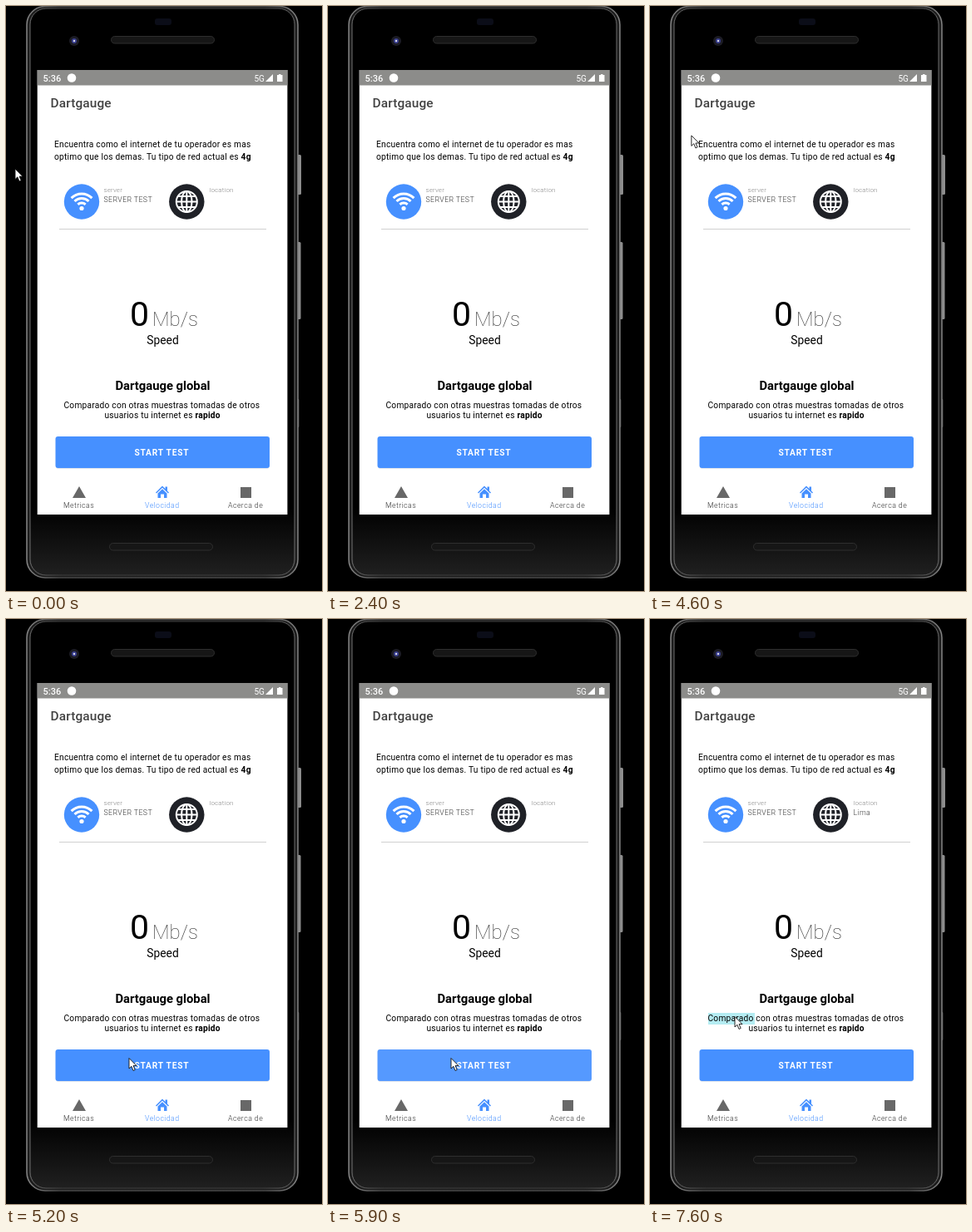
Write an HTML page that moves like this. It is 380x704 px and loops after 8000 ms.

```html
<!DOCTYPE html>
<html lang="es">
<head>
<meta charset="utf-8">
<title>Dartgauge</title>
<style>
  html, body { margin: 0; width: 100%; height: 100%; overflow: hidden; background: #000; }
  svg { display: block; width: 380px; height: 704px; }
  text { font-family: Roboto, "Liberation Sans", sans-serif; white-space: pre; }
  .body { font-size: 10.2px; letter-spacing: .23px; fill: #000; }
  .body tspan { font-weight: 700; }
  .label { font-size: 8px; font-weight: 300; letter-spacing: .15px; fill: #888; }
  .value { font-size: 8.76px; font-weight: 300; letter-spacing: .4px; fill: #333; }
  .tab { font-size: 8.76px; font-weight: 300; letter-spacing: .45px; fill: #333; }
  .mid { text-anchor: middle; }
  .line { fill: none; stroke: #fff; }
</style>
</head>
<body>
<svg viewBox="0 0 380 704">
  <defs>
    <linearGradient id="edge">
      <stop offset="0" stop-color="#858585"/>
      <stop offset=".12" stop-color="#484848"/>
      <stop offset=".88" stop-color="#484848"/>
      <stop offset="1" stop-color="#858585"/>
    </linearGradient>
    <linearGradient id="glass" x2="0" y2="1">
      <stop offset=".88" stop-color="#000"/>
      <stop offset="1" stop-color="#202020"/>
    </linearGradient>
    <clipPath id="button"><rect x="59.5" y="518" width="257.5" height="38" rx="3"/></clipPath>
  </defs>

  <!-- phone -->
  <g fill="#8d8d8d">
    <rect x="350" y="179" width="5" height="48" rx="1.5"/>
    <rect x="350" y="284" width="4.5" height="93" rx="1.5"/>
    <rect x="350" y="473" width="2.5" height="34" rx="1" fill="#444"/>
  </g>
  <rect x="25" y="0.500" width="326" height="687.500" rx="22" fill="#1c1c1c" stroke="url(#edge)" stroke-width="1.500"/>
  <rect x="29" y="3" width="318" height="682" rx="19" fill="url(#glass)" stroke="url(#edge)" stroke-width=".8"/>
  <rect x="179" y="15" width="20" height="8" rx="3" fill="#0b0d18"/>
  <circle cx="82" cy="42" r="6" fill="#1c1c24"/>
  <circle cx="82" cy="42" r="3" fill="#3a3f90"/>
  <circle cx="82" cy="42" r="1.200" fill="#dde"/>
  <g fill="#161616" stroke="#2e2e2e">
    <rect x="126.500" y="36.500" width="124" height="8.500" rx="4.200"/>
    <rect x="124.500" y="646.500" width="124" height="8.500" rx="4.200"/>
  </g>

  <!-- screen and status bar -->
  <rect x="37.700" y="77" width="300.700" height="535" fill="#fff"/>
  <rect x="37.700" y="77" width="300.700" height="18.500" fill="#8c8c8a"/>
  <g fill="#fff">
    <text x="44.500" y="91" font-size="11" font-weight="500">5:36</text>
    <circle cx="79" cy="86.500" r="5.300"/>
    <text x="298.500" y="90.500" font-size="10">5G</text>
    <path d="M312 91H321V82Z M326 83H328V82H330.500V83H332.500V91H326Z"/>
  </g>

  <text x="53.500" y="122" font-size="15.400" font-weight="500" letter-spacing=".15" fill="#424242">Dartgauge</text>
  <text class="body" x="58" y="170">Encuentra como el internet de tu operador es mas</text>
  <text class="body" x="58" y="184.500">optimo que los demas. Tu tipo de red actual es <tspan>4g</tspan></text>

  <!-- server and location -->
  <circle cx="91" cy="235.500" r="21.200" fill="#4690ff"/>
  <path class="line" stroke-width="3" d="M78.600 231.100A17.500 17.500 0 0 1 103.400 231.100M82.500 235A12 12 0 0 1 99.500 235M86.400 238.900A6.500 6.500 0 0 1 95.600 238.900"/>
  <circle cx="91" cy="243.500" r="2.600" fill="#fff"/>
  <circle cx="217.300" cy="235.500" r="21.200" fill="#1f2127"/>
  <g class="line" stroke-width="2">
    <circle cx="217.300" cy="235.500" r="12.500"/>
    <ellipse cx="217.300" cy="235.500" rx="6.200" ry="12.500"/>
    <path d="M217.300 223V248M204.800 235.500H229.800M207 229H227.600M207 242H227.600"/>
  </g>
  <text class="label" x="117.500" y="223.500">server</text>
  <text class="value" x="117.500" y="235.500">SERVER TEST</text>
  <text class="label" x="244.500" y="223.500">location</text>
  <text class="value" id="city" x="244.500" y="235.500">Lima</text>
  <path d="M64 268.500H313" stroke="#d0d0d0"/>

  <!-- reading -->
  <text x="149" y="384.500" font-size="41">0</text>
  <text x="176" y="384.500" font-size="24" font-weight="100" fill="#333">Mb/s</text>
  <text class="mid" x="188.500" y="407" font-size="13.800">Speed</text>
  <text class="mid" x="188.500" y="462" font-size="14.800" font-weight="700">Dartgauge global</text>
  <rect id="mark" x="70" y="474" width="56" height="14" fill="#b4ecf2"/>
  <text class="body" x="69.500" y="483.500">Comparado con otras muestras tomadas de otros</text>
  <text class="body" x="118.500" y="496">usuarios tu internet es <tspan>rapido</tspan></text>

  <!-- button -->
  <rect x="60" y="519" width="256.500" height="38" rx="3" fill="#dfe4ec"/>
  <g clip-path="url(#button)">
    <rect x="59" y="518" width="259" height="39" fill="#4690ff"/>
    <circle id="ripple" cx="169" cy="535" fill="#fff"/>
  </g>
  <text x="154.500" y="541" font-size="10.200" font-weight="700" letter-spacing=".8" fill="#fff">START TEST</text>

  <!-- tabs -->
  <path d="M88 578L96 592H80Z M282 579H295V592H282Z" fill="#686868"/>
  <path d="M180 585.500L188 577.500L191.500 581V578.500H194V583.500L196 585.500L195 586.500L188 579.700L181 586.500ZM182.500 586.500L188 581.200L193.500 586.500V592H190V587.500H186V592H182.500Z" fill="#4690ff"/>
  <text class="tab" x="69" y="604">Metricas</text>
  <text class="tab" x="167" y="604" style="fill:#4690ff">Velocidad</text>
  <text class="tab" x="267" y="604">Acerca de</text>

  <path id="cursor" d="M.5 .5V13L3.400 10.300L5.500 15.500L7.700 14.500L5.600 9.600H9.500Z" fill="#fff" stroke="#111" stroke-width=".9"/>
</svg>
<script>
  const LOOP = 8000, STEP = 100;
  const $ = id => document.getElementById(id);
  const show = (el, on) => el.setAttribute("visibility", on ? "visible" : "hidden");

  // [start time, x, y]; no position means hidden
  const stops = [
    [0, 10.5, 195.5], [500, 136, 227], [2400], [3600, 53, 223], [3900, 144, 225],
    [4100, 15, 25], [5200, 147.5, 528], [6300, 140, 534], [6400, 101.5, 478]
  ];
  // ripple [radius, opacity] per step from 5700 ms
  const ripple = [[103, .2], [180, .15], [180, .08], [180, .04]];

  function cursorAt(t) {
    if (t >= 4400 && t < 5200) {
      const k = (Math.floor(t / STEP) - 43) / 9, e = k * k * (3 - 2 * k);
      return [15 + 132.5 * e, 25 + 503 * e];
    }
    return stops.filter(s => s[0] <= t).pop().slice(1);
  }

  function draw(now) {
    const t = now % LOOP;
    const [x, y] = cursorAt(t);
    show($("cursor"), x !== undefined);
    if (x !== undefined) $("cursor").setAttribute("transform", `translate(${x} ${y})`);

    const [r, alpha] = ripple[Math.floor((t - 5700) / STEP)] || [0, 0];
    $("ripple").setAttribute("r", r);
    $("ripple").setAttribute("opacity", alpha);

    show($("city"), t >= 6300);
    show($("mark"), t >= 7600);
    requestAnimationFrame(draw);
  }
  draw(performance.now());
</script>
</body>
</html>
```
